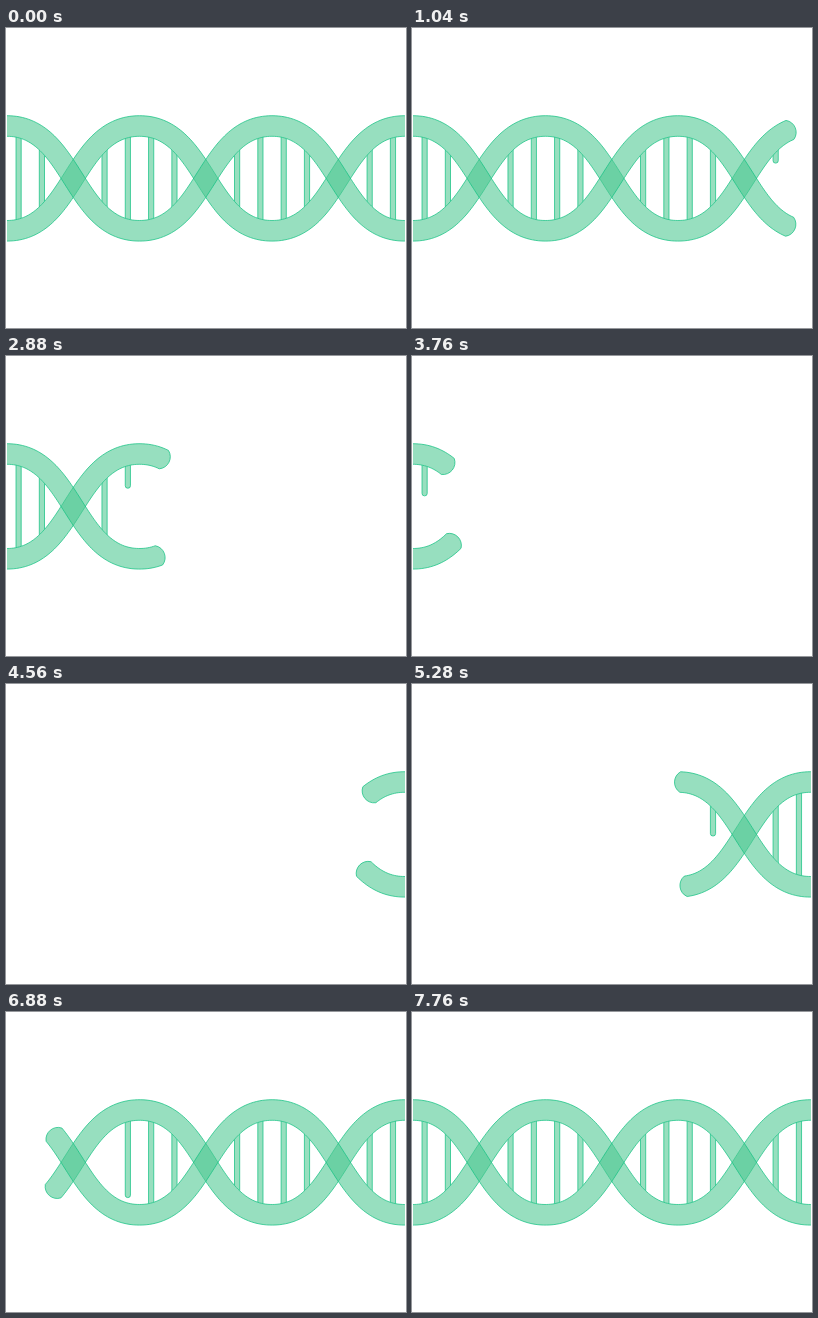
These frames come from a looping animation (400x300 px, 7840 ms). An HTML page with a canvas:

```html
<!DOCTYPE html>
<html lang="en">
<head>
<meta charset="utf-8">
<title>DNA helix</title>
<style>
  html, body { margin: 0; width: 100%; height: 100%; overflow: hidden; background: #fff; }
  canvas { display: block; }
</style>
</head>
<body>
<canvas id="stage" width="400" height="300"></canvas>
<script>
const ctx = document.getElementById('stage').getContext('2d');
const LOOP = 7840, STEP = 80, REDRAW = 4200;
const MID = 150.4, AMP = 52.4, HALF = 132.55, RIGHT = 398.6, RADIUS = 10.3;
const FILL = 'rgba(77,200,145,.58)', EDGE = 'rgba(16,192,128,.9)';
const RUNGS = 12, SPACING = 23.3;

// Each part is wiped and then redrawn, from right to left.
const strands = [
  { sign: -1, erase: { start: 912, duration: 3105 }, draw: { start: 4344, duration: 2809 } },
  { sign: 1, erase: { start: 912, duration: 3055 }, draw: { start: 4295, duration: 2871 } }
];
const rungs = { erase: { start: 620, duration: 3260 }, draw: { start: 4709, duration: 3053 } };
const STRAND_EASE = -.06, RUNG_EASE = .155;

// Runs a little past 0 and 1, so that the rounded ends leave the stage.
function progress({ start, duration }, time, ease) {
  const s = Math.min(1.02, Math.max(-.02, (time - start) / duration));
  return s + ease * s * (1 - s);
}

// Point on a strand (u from 0 at the right to 3 at the left) with its direction.
function pointAt(u, sign) {
  const k = Math.floor(u), t = u - k, s = k % 2 ? -sign : sign;
  const x = RIGHT - HALF * (k + 1.5 * t * (1 - t) + t ** 3);
  const y = MID + s * AMP * (1 - 2 * t * t * (3 - 2 * t));
  const dx = -HALF * (1.5 - 3 * t + 3 * t * t);
  const dy = -s * AMP * 12 * t * (1 - t);
  const len = Math.hypot(dx, dy);
  return { x, y, dx: dx / len, dy: dy / len };
}

const side = (p, r, ahead = 0) => [p.x - p.dy * r + p.dx * ahead, p.y + p.dx * r + p.dy * ahead];

function strandPath(from, to, sign) {
  const path = new Path2D();
  const n = Math.max(2, Math.ceil((to - from) * 70));
  const points = Array.from({ length: n + 1 }, (_, i) => pointAt(from + (to - from) * i / n, sign));
  const bulge = (p, r, ahead) =>
    path.bezierCurveTo(...side(p, r * .55, ahead), ...side(p, -r * .55, ahead), ...side(p, -r));
  points.forEach(p => path.lineTo(...side(p, RADIUS)));
  bulge(points[n], RADIUS, 7.7);
  points.reverse().forEach(p => path.lineTo(...side(p, -RADIUS)));
  bulge(points[n], -RADIUS, -7.7);
  path.closePath();
  return path;
}

function paint(path) {
  ctx.fillStyle = FILL;
  ctx.strokeStyle = EDGE;
  ctx.lineWidth = .8;
  ctx.fill(path);
  ctx.stroke(path);
}

function drawRungs(time, redraw) {
  const done = RUNGS * progress(redraw ? rungs.draw : rungs.erase, time, RUNG_EASE);
  for (let i = 0; i < RUNGS; i++) {
    const part = Math.min(1, Math.max(0, done - i));
    const shown = redraw ? part : 1 - part;
    if (!shown) continue;
    // Four rungs to a loop of the helix, the first loop cut in half.
    const slot = (i + 2) % 4;
    const x = RIGHT - HALF * Math.floor((i + 2) / 4) + (1.5 - slot) * SPACING;
    const half = slot % 3 ? 42.4 : 30;
    const length = 2 * half * shown + (shown === 1 ? 12 : 6);
    const path = new Path2D();
    path.roundRect(x - 2.6, MID - half - 6, 5.2, length, [0, 0, 2.5, 2.5]);
    paint(path);
  }
}

function render(time) {
  const redraw = time >= REDRAW;
  const paths = strands.map(({ sign, erase, draw }) => {
    const tip = 3 * progress(redraw ? draw : erase, time, STRAND_EASE);
    return redraw ? strandPath(-.1, tip, sign) : strandPath(tip, 3.1, sign);
  });

  ctx.clearRect(0, 0, 400, 300);
  ctx.save();
  ctx.beginPath();
  ctx.rect(1, 0, 398, 300);
  ctx.clip();
  drawRungs(time, redraw);
  // Rungs stop where the strands begin.
  ctx.globalCompositeOperation = 'destination-out';
  ctx.fillStyle = '#000';
  paths.forEach(path => ctx.fill(path));
  ctx.globalCompositeOperation = 'source-over';
  paths.forEach(paint);
  ctx.restore();
}

const start = performance.now();
function tick() {
  const time = (performance.now() - start) % LOOP;
  render(Math.floor(time / STEP) * STEP);
  requestAnimationFrame(tick);
}
tick();
</script>
</body>
</html>
```
